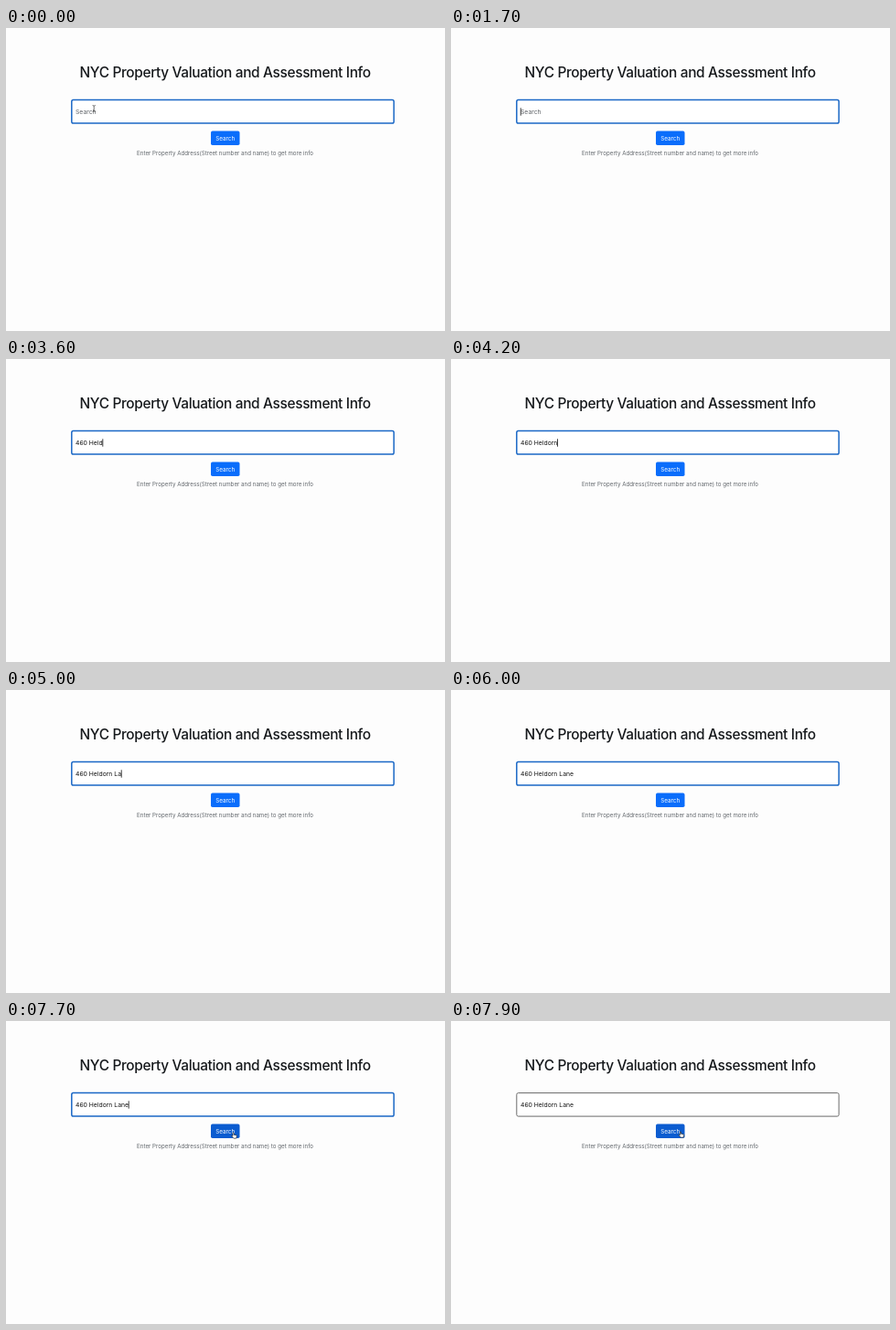
These frames come from a looping animation (480 by 331 pixels, 8000 ms). An HTML page:

```html
<!DOCTYPE html>
<html lang="en">
<head>
<meta charset="utf-8">
<title>Property search</title>
<style>
  html, body { margin: 0; width: 100%; height: 100%; overflow: hidden; background: #fdfdfd; }
  svg { display: block; width: 480px; height: 331px; }
  text { font-family: Inter, "Liberation Sans", sans-serif; white-space: pre; }
  .mid { text-anchor: middle; }
  #title { font-size: 15.4px; font-weight: 500; letter-spacing: -0.33px; fill: #16191c; }
  #entry { font-size: 6.8px; }
  #label { font-size: 6.35px; fill: #fff; }
  #hint { font-size: 6.19px; fill: #62676c; }
</style>
</head>
<body>
<svg viewBox="0 0 480 331">
  <text id="title" class="mid" x="239.6" y="53.9">NYC Property Valuation and Assessment Info</text>
  <rect id="field" x="71.8" y="78.6" width="352.3" height="25.5" rx="1.8" fill="#fff"/>
  <text id="entry" x="76" y="93.8"></text>
  <rect id="caret" y="87.3" width="0.8" height="8.4" fill="#111"/>
  <rect id="button" x="224" y="112.6" width="31.5" height="15.4" rx="1.8"/>
  <text id="label" class="mid" x="239.7" y="122.8">Search</text>
  <text id="hint" class="mid" x="239.6" y="139.4">Enter Property Address(Street number and name) to get more info</text>
  <g id="beam" fill="none" stroke="#333" stroke-width="0.7">
    <path d="M-1.6-3.4Q0-3.4 0-2.6Q0-3.4 1.6-3.4M0-2.6V2.6M-1.6 3.4Q0 3.4 0 2.6Q0 3.4 1.6 3.4"/>
  </g>
  <path id="arrow" d="M0 0V5.7L1.3 4.5L2.2 6.5L3.2 6.1L2.3 4.1H4.1Z" fill="#111" stroke="#fff" stroke-width="0.5"/>
  <path id="hand" d="M0 .4Q.6-.3 1.1.4V2.4L3.8 3Q4.4 3.2 4.3 4L3.8 6.4H.9L-1.3 3.9Q-1.2 3.1-.5 3.4L0 3.8Z"
        fill="#fff" stroke="#111" stroke-width="0.6" stroke-linejoin="round"/>
</svg>
<script>
  const LOOP = 8000;
  const ADDRESS = "460 Heldorn Lane";
  const KEYS = [1800, 2000, 2300, 2400, 2800, 3000, 3200, 3600,
                3700, 3900, 4200, 4400, 4800, 5000, 5100, 5500];
  const BLINKS = [[300, 800], [1300, 1800], [6500, 7000], [7500, 7800]];
  const BLUR = 7800;
  // [start, shape, x, y]
  const POINTER = [
    [0, "beam", 96.2, 88],
    [1700, "", 0, 0],
    [7200, "beam", 105, 91],
    [7300, "arrow", 152, 109],
    [7400, "arrow", 195.8, 123.6],
    [7500, "arrow", 222, 126],
    [7600, "hand", 240, 124],
    [7700, "hand", 248, 121.8],
    [7800, "hand", 250.4, 120.8]
  ];

  const $ = id => document.getElementById(id);
  const set = (id, attrs) => {
    for (const k in attrs) $(id).setAttribute(k, attrs[k]);
  };
  const show = (id, on) => set(id, { visibility: on ? "visible" : "hidden" });

  function draw(t) {
    const typed = KEYS.filter(k => k <= t).length;
    const entry = $("entry");
    const value = typed ? ADDRESS.slice(0, typed) : "Search";
    if (entry.textContent !== value) entry.textContent = value;
    set("entry", { fill: typed ? "#111" : "#5f6368" });

    const typing = t >= KEYS[0] && t < 6000;
    show("caret", typing || BLINKS.some(([a, b]) => t >= a && t < b));
    set("caret", { x: 75.8 + (typed ? entry.getComputedTextLength() : 0) });

    const focused = t < BLUR;
    set("field", {
      stroke: focused ? "#1b68c6" : "#6b6b6b",
      "stroke-width": focused ? 1.5 : 1
    });

    const [, shape, x, y] = POINTER.filter(p => p[0] <= t).pop();
    for (const id of ["beam", "arrow", "hand"]) show(id, id === shape);
    if (shape) set(shape, { transform: `translate(${x} ${y})` });
    set("button", { fill: shape === "hand" ? "#0b5cd0" : "#0a6dfb" });
  }

  const start = performance.now();
  function tick() {
    draw((performance.now() - start) % LOOP);
    requestAnimationFrame(tick);
  }
  tick();
</script>
</body>
</html>
```
